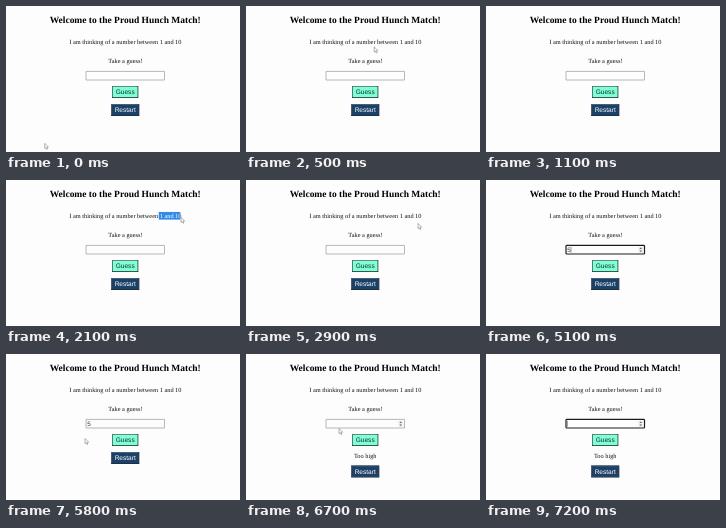
Animation of 234 by 146 pixels, one loop 8 s. Source, as an HTML page with a canvas:

```html
<!DOCTYPE html>
<html lang="en">
<head>
<meta charset="utf-8">
<title>Guessing page</title>
<style>
html, body { margin: 0; width: 100%; height: 100%; overflow: hidden; background: #fdfdfd; }
canvas { display: block; width: 234px; height: 146px; }
</style>
</head>
<body>
<canvas id="stage"></canvas>
<script>
const W = 234, H = 146, LOOP = 8000, STEP = 100;
const ZOOM = 0.3947; // page pixels to stage pixels
const MID = 119.2;
const PAPER = '#fdfdfd', INK = '#111';
const SERIF = '"Liberation Serif", "Times New Roman", serif';
const SANS = '"Liberation Sans", Arial, sans-serif';

const canvas = document.getElementById('stage');
const ctx = canvas.getContext('2d');
const dpr = window.devicePixelRatio || 1;
canvas.width = W * dpr;
canvas.height = H * dpr;

// Places the pointer visits
const spot = (x, y) => ({ x, y });
const corner = spot(38.7, 137.3);
const restart = spot(122, 101);
const phrase = spot(152.5, 34);
const phraseEnd = spot(175, 37.2);
const below = spot(172, 43.4);
const box = spot(107, 64.4);
const side = spot(79, 84.4);

// Each move starts at `from`, takes from `start` to `end`, then rests until `until`
const moves = [
  { start: 0, end: 600, until: 600, from: corner, to: phrase, bend: spot(-20, 80) },
  { start: 600, end: 1000, until: 1100, from: phrase, to: restart },
  { start: 1200, end: 1600, until: 1700, from: restart, to: phrase },
  { start: 1700, end: 2100, until: 2200, from: phrase, to: phraseEnd },
  { start: 2200, end: 2400, until: 3200, from: phraseEnd, to: below },
  { start: 3200, end: 3600, until: 4000, from: below, to: box },
  { start: 5200, end: 5700, until: 6600, from: box, to: side },
  { start: 6600, end: 6800, until: 6800, from: side, to: box }
];

const during = (t, from, to) => t >= from && t < to;
const ease = k => k * k * (3 - 2 * k);
const mix = (a, b, k) => a + (b - a) * k;
const between = (a, b, k) => spot(mix(a.x, b.x, k), mix(a.y, b.y, k));

function pointerAt(t) {
  const move = moves.find(m => during(t, m.start, m.until));
  if (!move) return null;
  const { from, to, start, end } = move;
  const bend = move.bend || between(from, to, 0.5);
  const k = ease(Math.min(1, (t - start) / (end - start)));
  return between(between(from, bend, k), between(bend, to, k), k);
}

function rect(x, y, w, h, color) {
  ctx.fillStyle = color;
  ctx.fillRect(x, y, w, h);
}

function text(str, x, y, font, color = INK, align = 'center') {
  ctx.save();
  ctx.translate(x, y);
  ctx.scale(ZOOM, ZOOM);
  ctx.font = font;
  ctx.textRendering = 'geometricPrecision';
  ctx.textAlign = align;
  ctx.fillStyle = color;
  ctx.fillText(str, 0, 0);
  ctx.restore();
}

function button(label, w, y, fill, ink, light, dark) {
  const x = MID - w / 2, h = 12, edge = 0.8;
  rect(x, y, w, h, dark);
  rect(x, y, w - edge, h - edge, light);
  rect(x + edge, y + edge, w - 2 * edge, h - 2 * edge, fill);
  text(label, MID, y + 8.1, `16.6px ${SANS}`, ink);
}

function arrow(x, y, size) {
  ctx.beginPath();
  ctx.moveTo(x - 1.3, y);
  ctx.lineTo(x + 1.3, y);
  ctx.lineTo(x, y + size);
  ctx.fill();
}

function field(value, focus, hover) {
  ctx.lineWidth = focus ? 1.2 : 0.8;
  ctx.strokeStyle = focus ? '#1c1c1c' : '#a6a6a6';
  ctx.beginPath();
  ctx.roundRect(80, 65.4, 78.5, 8.6, focus ? 0.8 : 0);
  ctx.stroke();
  text(value, 81.2, 72, `16px ${SANS}`, '#333', 'left');
  if (focus) rect(value ? 84.8 : 81.2, 66.7, 0.45, 6, '#333');
  if (focus || hover) {
    rect(152.4, 66.4, 4.6, 6.6, '#efefef');
    ctx.fillStyle = '#606060';
    arrow(154.7, 68.9, -1.5);
    arrow(154.7, 70.5, 1.5);
  }
}

function hint(color) {
  text('I am thinking of a number between 1 and 10', MID + 0.2, 37.6, `16px ${SERIF}`, color);
}

function selection(right) {
  const area = [phrase.x, 31.8, right - phrase.x, 8];
  ctx.save();
  ctx.beginPath();
  ctx.rect(...area);
  ctx.clip();
  rect(...area, '#2f8be6');
  hint('#fff');
  ctx.restore();
}

function pointer({ x, y }) {
  ctx.save();
  ctx.translate(x, y);
  ctx.lineWidth = 0.55;
  ctx.lineJoin = 'round';
  ctx.fillStyle = '#fff';
  ctx.strokeStyle = '#777';
  const shape = new Path2D('M0 0V5.2L1.2 4.2L2 6.1L2.9 5.7L2.1 3.9L3.7 3.8Z');
  ctx.fill(shape);
  ctx.stroke(shape);
  ctx.restore();
}

function draw(t) {
  const answered = t >= 6000;
  const typed = during(t, 5100, 6000);
  const focus = during(t, 4000, 5600) || t >= 7000;
  const hover = during(t, 6700, 7000);
  const tip = pointerAt(t);

  ctx.setTransform(dpr, 0, 0, dpr, 0, 0);
  rect(0, 0, W, H, PAPER);

  text('Welcome to the Proud Hunch Match!', MID, 17.2, `bold 24px ${SERIF}`, '#000');
  hint(INK);
  if (during(t, 1700, 2800)) selection(t < 2100 ? tip.x : phraseEnd.x - 0.4);
  text('Take a guess!', MID + 0.2, 57.1, `16px ${SERIF}`);

  field(typed ? '5' : '', focus, hover);
  button('Guess', 26.2, 80, '#7fffd4', '#12303c', '#55706a', '#16211f');
  if (answered) text('Too high', MID, 103.6, `16px ${SERIF}`);
  button('Restart', 28.2, answered ? 111.5 : 98, '#1c4168', '#fff', '#53677c', '#101c2a');

  if (tip) pointer(tip);
}

function tick() {
  const t = performance.now() % LOOP;
  draw(Math.floor(t / STEP) * STEP);
  requestAnimationFrame(tick);
}
tick();
</script>
</body>
</html>
```
